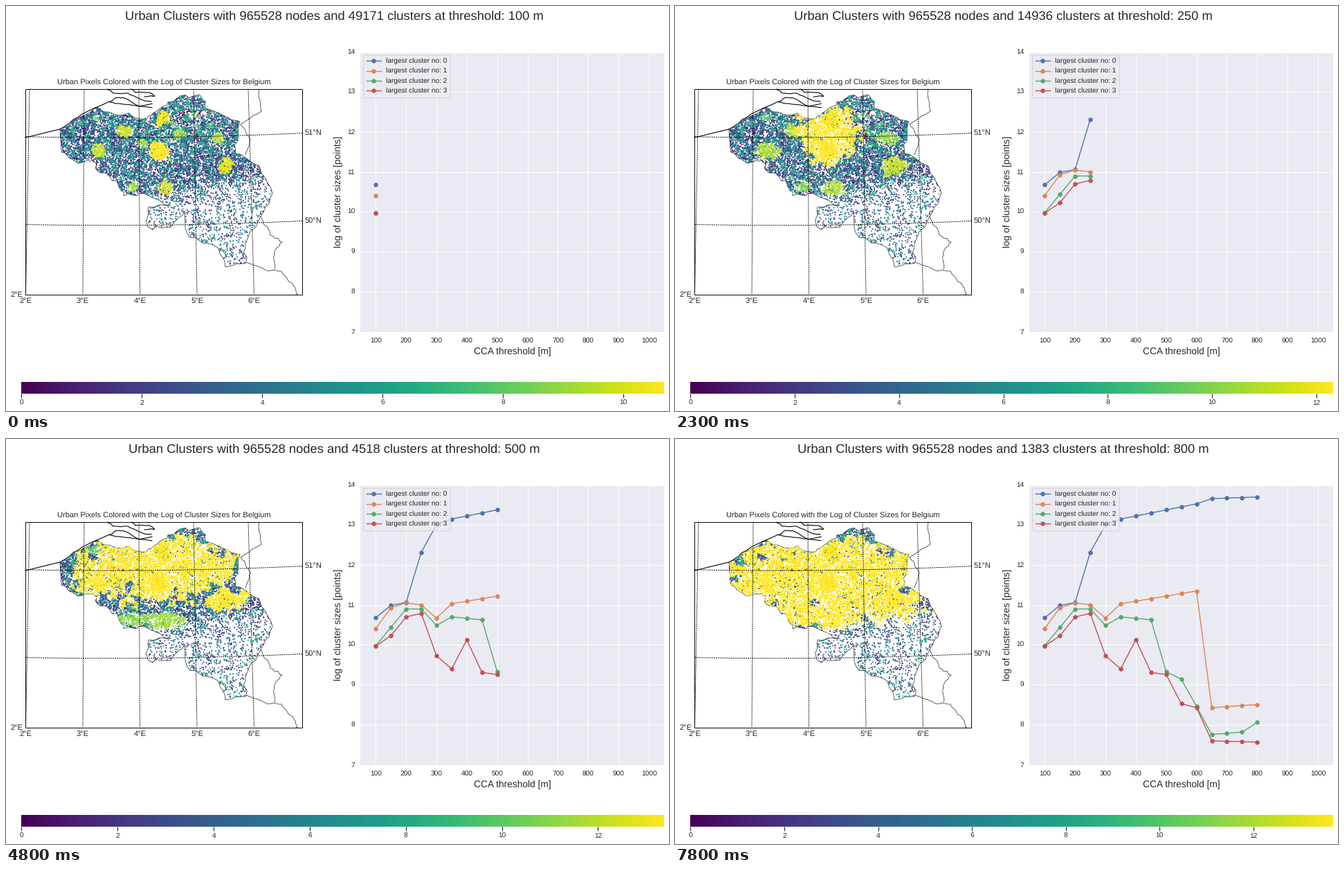
These frames come from a looping animation (958 px wide and 585 px high, 8 s). A matplotlib script:

```python
import numpy as np
import matplotlib
import matplotlib.pyplot as plt
from matplotlib.animation import FuncAnimation
from matplotlib.patches import FancyBboxPatch, Rectangle
from matplotlib.path import Path

W, H, DPI = 958, 585, 64
PX = 72 / DPI  # points per pixel
INK = "#262626"
matplotlib.rcParams["font.family"] = "Liberation Sans"
matplotlib.rcParams["text.hinting"] = "none"
rng = np.random.default_rng(7)
run = np.linspace

# Chart data: single values where a curve bends, straight runs elsewhere
THRESHOLDS = np.arange(100, 801, 50)
SIZES = [
    [10.68, 10.99, 11.06, 12.32, 13, *run(13.15, 13.53, 6), *run(13.66, 13.7, 4)],
    [10.41, 10.93, 11.05, 11, 10.67, *run(11.03, 11.35, 6), *run(8.43, 8.51, 4)],
    [*run(9.98, 10.9, 3), 10.9, 10.49, *run(10.7, 10.63, 3), 9.33, 9.14, 8.46,
     *run(7.76, 7.82, 3), 8.06],
    [9.97, 10.23, 10.7, 10.79, 9.73, 9.4, 10.13, 9.31, 9.26, 8.53, 8.43, *run(7.6, 7.57, 4)],
]
COLORS = ["#4C72B0", "#DD8452", "#55A868", "#C44E52"]
KNOWN_COUNTS = {100: 49171, 150: 26614, 250: 14936, 400: 6968, 500: 4518, 600: 3025, 800: 1383}
COUNTS = np.exp(np.interp(THRESHOLDS, list(KNOWN_COUNTS), np.log(list(KNOWN_COUNTS.values()))))

# Map outlines as a few anchors, roughened when drawn
COAST = [(28, 190), (78, 178), (110, 156), (149, 138), (160, 141), (181, 143), (211, 147)]
BORDER = [(78, 178), (81, 211), (104, 227), (127, 223), (132, 238), (160, 252),
          (170, 274), (200, 271), (237, 288), (206, 290), (205, 319), (238, 320),
          (257, 298), (266, 334), (306, 349), (317, 377), (346, 372), (346, 343),
          (368, 304), (385, 271), (366, 231), (332, 213), (338, 167), (289, 148),
          (279, 128), (245, 135), (222, 148), (204, 162), (158, 157), (130, 146), (78, 178)]
ISLANDS = [
    [(147, 120), (155, 126), (176, 126), (198, 136), (210, 138)],
    [(181, 120), (187, 125), (208, 125), (215, 130), (200, 131)],
    [(150, 139), (160, 132), (171, 133), (193, 145), (211, 141)],
]
NEIGHBOURS = [
    [(366, 120), (369, 152), (339, 171), (353, 193), (346, 215)],
    [(368, 304), (382, 331), (399, 341), (388, 355), (388, 380)],
    [(347, 370), (376, 382), (398, 383), (417, 406), (419, 417)],
]

# Cities: x, y, radius, threshold at which the largest cluster absorbs them
CITIES = [
    (226, 164, 12, 100), (221, 209, 13, 100), (171, 182, 10, 300), (134, 210, 10, 350),
    (130, 162, 6, 550), (240, 224, 6, 400), (197, 198, 8, 250), (250, 185, 8, 250),
    (306, 191, 9, 450), (318, 233, 11, 500), (230, 263, 10, 650), (183, 261, 8, 650),
    (333, 370, 3, 900),
]
# Half axes of the largest cluster's core at some thresholds
CORE_M = [100, 150, 250, 300, 400, 600, 800]
CORE_RX = [1, 11, 46, 72, 108, 140, 172]
CORE_RY = [1, 36, 42, 40, 45, 54, 64]


def rough(points, amp=1.0, parts=5):
    """Subdivide a polyline and jitter the new points, keeping the anchors."""
    points = np.array(points, float)
    t = np.arange((len(points) - 1) * parts + 1) / parts
    line = np.column_stack([np.interp(t, range(len(points)), c) for c in points.T])
    return line + rng.normal(0, amp, line.shape) * (t % 1 > 0)[:, None]


def ellipse(x, y, rx, ry):
    return ((pixels[:, 0] - x) / rx) ** 2 + ((pixels[:, 1] - y) / ry) ** 2


def nearest(xy, centres):
    """Index of and distance to the nearest centre."""
    index, dist = [], []
    for chunk in np.array_split(xy, 40):
        d = np.hypot(*(chunk[:, None] - centres).transpose(2, 0, 1))
        index.append(d.argmin(1))
        dist.append(d.min(1))
    return np.concatenate(index), np.concatenate(dist)


def random_sites(n):
    xy = rng.uniform((76, 124), (388, 380), (n, 2))
    return xy[Path(border).contains_points(xy)]


border = rough(BORDER, 1.6)

# Settlements: dense in the north, sparse in the south, solid in the cities
towns, districts = random_sites(2600), random_sites(900)
pixels = random_sites(75000)
home, gap = nearest(pixels, towns)
x, y = pixels.T
north = 1 / (1 + np.exp((y - 275 + 0.18 * (x - 200)) / 6))
density = (0.08 + 0.32 * north) * np.where(gap < 3, 1.5, 0.6)
for cx, cy, r, _ in CITIES:
    density = np.maximum(density, (ellipse(cx, cy, r, r) < 1) * min(r / 12, 1) ** 2)
keep = rng.random(len(pixels)) < density
pixels, home, gap = pixels[keep], home[keep], gap[keep]

bump = np.exp(-((towns[:, 0] - 265) / 70) ** 2 - ((towns[:, 1] - 165) / 42) ** 2)
town_level = 0.1 + 0.55 * rng.beta(2, 2, len(towns)) + 0.15 * bump
lone_level = 0.45 * rng.beta(1, 1.5, len(pixels))
base = np.where(gap < 3, town_level[home], lone_level)

# Ragged cluster edges follow the districts; a few pixels stay isolated
reach = 1 + rng.normal(0, 0.32, len(districts))[nearest(pixels, districts)[0]]
reach -= 1.3 * rng.random(len(pixels)) ** 14


def pixel_levels(m, top):
    level = base.copy()
    grow = min(1 + (m - 100) / 350, 2.2)
    for cx, cy, r, joins in CITIES:
        size = min(6 + 0.38 * r + 0.0006 * r * (m - 100), 11.35)
        inside = ellipse(cx, cy, r * grow ** 1.5, r * grow ** 0.3) < reach
        level[inside] = 1 if m >= joins else size / top
    core = (222, 187 + 0.09 * max(m - 600, 0),
            np.interp(m, CORE_M, CORE_RX), np.interp(m, CORE_M, CORE_RY))
    level[ellipse(*core) < reach] = 1
    return level


viridis = plt.get_cmap("viridis")
pixel_colors = [viridis(pixel_levels(m, top)) for m, top in zip(THRESHOLDS, SIZES[0])]

fig = plt.figure(figsize=(W / DPI, H / DPI), dpi=DPI, facecolor="white")
ax = fig.add_axes([0, 0, 1, 1])


def label(x, y, text, size, ha="center", **kw):
    """Text whose capitals are centred on y."""
    return ax.text(x, y + 0.36 * size - 0.8, text, size=size * PX, ha=ha,
                   va="baseline", color=INK, **kw)


def stroke(points, width, color="black", z=1, **kw):
    ax.plot(*np.transpose(points), color=color, lw=width * PX, zorder=z, **kw)


# Map
for line in [COAST] + ISLANDS:
    stroke(rough(line, 0.5), 1.1)
for line in NEIGHBOURS:
    stroke(rough(line), 0.6)
stroke(border, 0.6)
dots = ax.scatter(*pixels.T, s=(2 * PX) ** 2, linewidths=0, zorder=2)
dash = dict(ls=(0, (2.2, 1.2)), z=3)
for i in range(5):
    stroke([(34 + 79 * i, 120), (28.5 + 82.5 * i, 416.5)], 0.9, **dash)
    label(28.5 + 82.6 * i, 426, f"{i + 2}°E", 11.07)
gx = np.linspace(28.5, 428.5, 50)
for gy, name in [(190, "51°N"), (316.8, "50°N")]:
    stroke(np.column_stack([gx, gy - 8.2e-5 * (gx - 150) ** 2]), 0.9, **dash)
    label(432, gy - 6.8, name, 11.07, "left")
label(24.5, 417, "2°E", 11.07, "right")
ax.add_patch(Rectangle((28.5, 119.6), 400, 297, fill=False, ec="black", lw=0.95 * PX, zorder=4))
label(228.5, 111, "Urban Pixels Colored with the Log of Cluster Sizes for Belgium", 11.07)

# Chart
LEFT, RIGHT, TOP, BOTTOM = 512.3, 951, 66.5, 470.7


def chart_x(m):
    return LEFT + (np.asarray(m) - 50) / 1000 * (RIGHT - LEFT)


def chart_y(v):
    return BOTTOM - (np.asarray(v) - 7) / 7 * (BOTTOM - TOP)


ax.add_patch(Rectangle((LEFT, TOP), RIGHT - LEFT, BOTTOM - TOP, fc="#EAEAF2", lw=0, zorder=0))
for m in range(100, 1001, 100):
    stroke([(chart_x(m), TOP), (chart_x(m), BOTTOM)], 0.92, "white")
    label(chart_x(m), 484, str(m), 10.15)
for v in range(7, 15):
    stroke([(LEFT, chart_y(v)), (RIGHT, chart_y(v))], 0.92, "white")
    label(504, chart_y(v), str(v), 10.15, "right")
label(731.7, 499, "CCA threshold [m]", 13.8)
ax.text(480.5, 268.3, "log of cluster sizes [points]", size=13.8 * PX, rotation=90,
        ha="center", va="center", color=INK)

ax.add_patch(FancyBboxPatch((516.7, 71.2), 125.6, 61.6, boxstyle="round,pad=0,rounding_size=2",
                            fc="#EAEAF2", ec="#CCCCCC", alpha=0.8, lw=0.92 * PX, zorder=6))
curves = []
for i, color in enumerate(COLORS):
    style = dict(color=color, lw=1.38 * PX, marker="o", ms=5.5 * PX, mew=0.9 * PX)
    curves += ax.plot([], [], zorder=5, **style)
    ly = 79.2 + 14.3 * i
    ax.plot([521, 542], [ly, ly], zorder=7, **{**style, "marker": ""})
    ax.plot([531.5], [ly], zorder=7, **style)
    label(549, ly, f"largest cluster no: {i}", 10.15, "left", zorder=7)

# Colour bar
BAR_LEFT, BAR_RIGHT = 22.5, 951
ax.imshow(np.linspace(0, 1, 256)[None], cmap=viridis, aspect="auto",
          extent=(BAR_LEFT, BAR_RIGHT, 559.7, 543))
ticks, = ax.plot([], [], ls="", marker=3, ms=5.5 * PX, mew=1.15 * PX, color=INK)
tick_values = np.arange(0, 14, 2)
tick_labels = [label(0, 573.3, str(v), 10.15) for v in tick_values]
title = label(474.7, 14, "", 18.4)

ax.set_xlim(0, W)
ax.set_ylim(H, 0)
ax.axis("off")


def update(frame):
    step = 0 if frame < 13 else 1 + (frame - 13) // 5
    m, top = THRESHOLDS[step], SIZES[0][step]
    title.set_text(f"Urban Clusters with 965528 nodes and {COUNTS[step]:.0f} clusters at threshold: {m} m")
    dots.set_facecolors(pixel_colors[step])
    for curve, sizes in zip(curves, SIZES):
        curve.set_data(chart_x(THRESHOLDS[:step + 1]), chart_y(sizes[:step + 1]))
    tick_x = BAR_LEFT + tick_values / top * (BAR_RIGHT - BAR_LEFT)
    shown = tick_values <= top
    ticks.set_data(tick_x[shown], np.full(shown.sum(), 559.7))
    for text, tx, visible in zip(tick_labels, tick_x, shown):
        text.set_x(tx)
        text.set_visible(visible)
    return [title, dots, ticks, *curves, *tick_labels]


anim = FuncAnimation(fig, update, frames=80, interval=100, repeat=True, repeat_delay=0)
plt.show()
```
